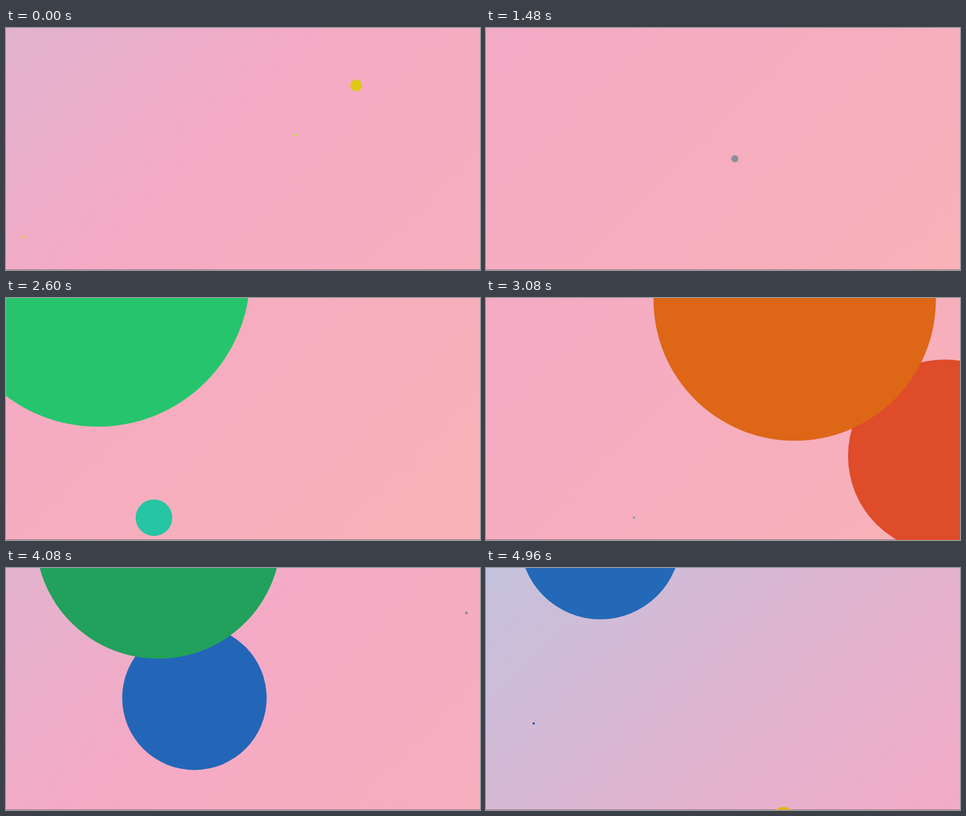
Recreate the animation shown at these times as an HTML page with a canvas. Size 800 px wide and 409 px high, loop 5 s.

```html
<!DOCTYPE html>
<html lang="en">
<head>
<meta charset="utf-8">
<title>Shrinking circles</title>
<style>
html, body { margin: 0; width: 100%; height: 100%; overflow: hidden; background: #f6a9c3; }
canvas { display: block; width: 800px; height: 409px; }
</style>
</head>
<body>
<canvas id="stage" width="800" height="409"></canvas>
<script>
const W = 800, H = 409, LOOP = 5000, STEP = 40;
const START_RADIUS = 284.4;
const TICK = 1000 / 60;   // each tick: radius * 0.9, hue + 1
const ctx = document.getElementById('stage').getContext('2d');

// Hue, saturation and lightness at birth
const red = [6, 74, 52], orange = [22, 81, 48], emerald = [146, 68, 46],
      green = [144, 66, 38], sea = [168, 66, 38], blue = [205, 68, 43],
      grey = [184, 7, 57];

const circles = [];
const pop = (birth, color, x, y) => circles.push({ birth, color, x, y });

pop(-770, orange, 490, 181.3);
pop(-770, red, 30, 353.3);
pop(-530, orange, 591, 97);
pop(870, grey, 420, 221);
pop(1548, green, 355.5, 286);
pop(1718, red, 320, -79);
pop(2249, emerald, 249.7, 371.3);
pop(2584, emerald, 155, -39.5);
pop(2992, red, 774, 267);
pop(3052, orange, 521, 3);
pop(3329, grey, 777, 76);
pop(3946, blue, 318, 219.5);
pop(4030, green, 257, -54);
pop(4175, sea, 80.5, 262.7);
pop(4532, orange, 502, 422.7);
pop(4843, blue, 193, -49);

// The gradient eases to its turning point, then accelerates back.
function gradientShift(t) {
  const turn = 2800, far = 1.03;
  return t < turn
    ? far - 0.48 * (1 - t / turn) ** 2
    : far * (1 - ((t - turn) / 2110) ** 1.6);
}

function drawBackground(t) {
  const span = (W + H) / 2;
  const a = -gradientShift(t) * span, b = a + 2 * span;
  const g = ctx.createLinearGradient(a, a, b, b);
  g.addColorStop(0, 'rgb(198,193,220)');
  g.addColorStop(0.25, 'rgb(223,180,208)');
  g.addColorStop(0.5, 'rgb(245,170,197)');
  g.addColorStop(1, 'rgb(248,178,183)');
  ctx.fillStyle = g;
  ctx.fillRect(0, 0, W, H);
  ctx.fillStyle = '#8c7280';
  ctx.fillRect(0, H - 1, W, 1);
}

function drawCircle({ birth, color: [hue, sat, light], x, y }, t) {
  const ticks = (t - birth) / TICK;
  const r = START_RADIUS * 0.9 ** ticks;
  if (ticks < 0 || r < 0.3) return;
  ctx.fillStyle = `hsl(${hue + ticks}, ${sat}%, ${light}%)`;
  ctx.beginPath();
  ctx.arc(x, y, r, 0, Math.PI * 2);
  ctx.fill();
}

const begin = performance.now();
function frame() {
  const now = (performance.now() - begin) % LOOP;
  const t = Math.floor(now / STEP) * STEP;
  drawBackground(t);
  for (const c of circles) drawCircle(c, t);
  requestAnimationFrame(frame);
}
frame();
</script>
</body>
</html>
```
